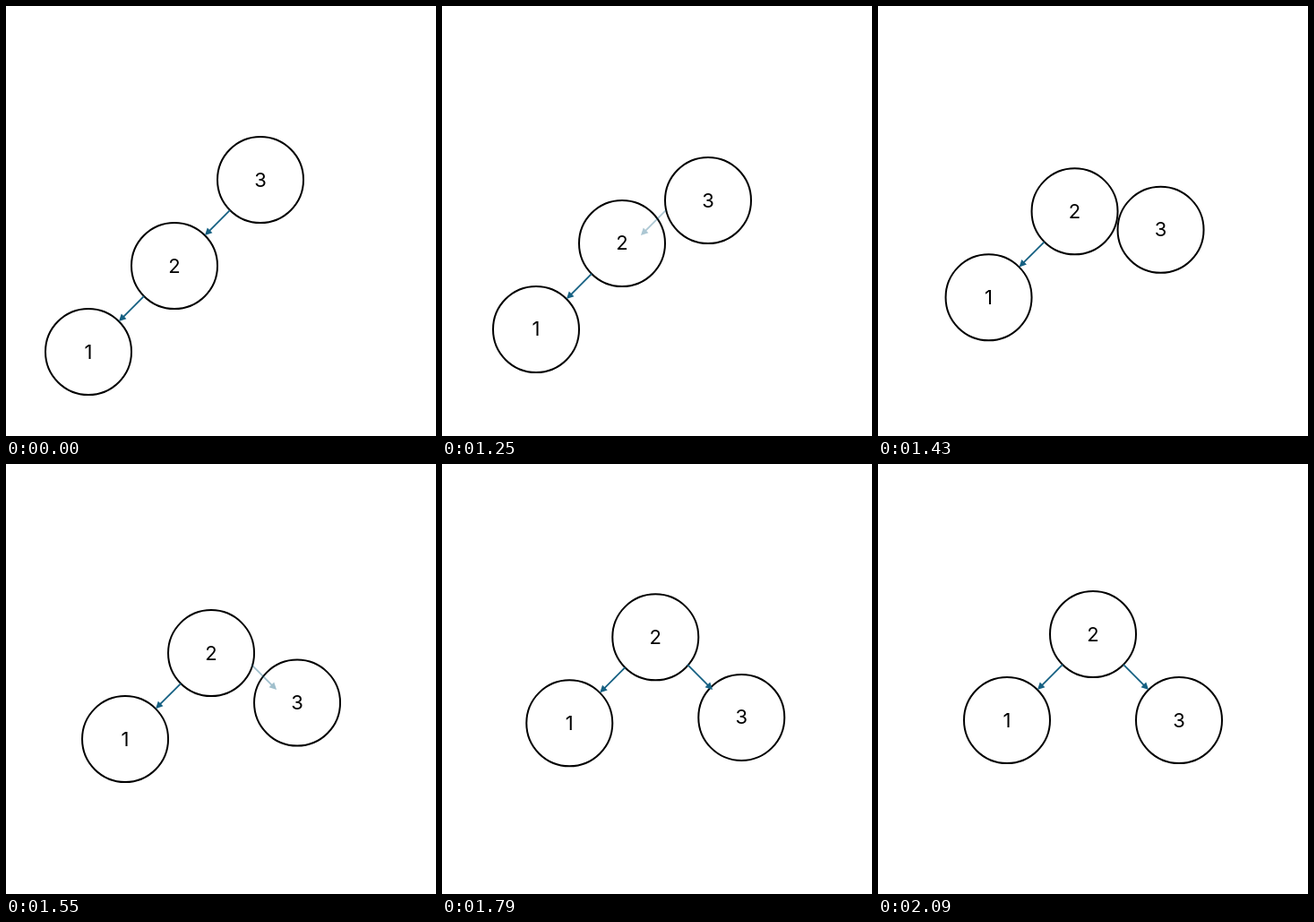
An HTML page for the animation above (3220 ms loop, 480 by 480 pixels).

```html
<!DOCTYPE html>
<html lang="en">
<head>
<meta charset="utf-8">
<title>Tree rotation</title>
<style>
  html, body { margin: 0; width: 100%; height: 100%; overflow: hidden; background: #fff; }
  svg { display: block; width: 100%; height: 100%; }
  circle { fill: none; stroke: #000; stroke-width: 2; }
  text { font: 22px Inter, "Liberation Sans", sans-serif; text-anchor: middle; }
  .arrow { fill: #156082; stroke: #156082; }
</style>
</head>
<body>
<svg id="stage" viewBox="0 0 480 480"></svg>
<script>
const LOOP = 3220, START = 1130, STEP = 60, MORPH = 1000;
const R = 48, EDGE = R * Math.SQRT1_2;
const stage = document.getElementById('stage');

function add(parent, tag, attrs) {
  const el = document.createElementNS('http://www.w3.org/2000/svg', tag);
  for (const key in attrs) el.setAttribute(key, attrs[key]);
  return parent.appendChild(el);
}

function addNode(label, from, to) {
  const el = add(stage, 'g', {});
  add(el, 'circle', { r: R });
  add(el, 'text', { y: 7.5 }).textContent = label;
  return { el, from, to };
}

// Diagonal arrow whose tail touches a parent node centred on the origin.
function addArrow(side) {
  const el = add(stage, 'g', { class: 'arrow' });
  const g = add(el, 'g', { transform: `rotate(${side < 0 ? 135 : 45})` });
  const tip = 96 * Math.SQRT2 - R;
  add(g, 'path', { d: `M${R} 0H${tip - 6}`, 'stroke-width': 1.8 });
  add(g, 'path', { d: `M${tip} 0l-8 -4v8z`, stroke: 'none' });
  return el;
}

const nodes = [
  addNode('1', [92, 386], [144, 286]),
  addNode('2', [188, 290], [240, 190]),
  addNode('3', [284, 194], [336, 286])
];
const leftArrow = addArrow(-1);
const oldArrow = addArrow(-1);
const newArrow = addArrow(1);

const clamp = v => Math.max(0, Math.min(1, v));
const place = (el, [x, y]) => el.setAttribute('transform', `translate(${x} ${y})`);
const mix = (a, b, p) => a.map((v, i) => v + (b[i] - v) * p);

// Quick start, long cubic settle.
function ease(u) {
  return u < 0.36
    ? u * u * (12.22 - 29.1 * u + 22.7 * u * u)
    : 1 - 1.5 * (1 - u) ** 3;
}

place(oldArrow, nodes[2].from);
place(newArrow, nodes[1].to);

function draw(time) {
  const t = time % LOOP;
  const step = t < START ? 0 : Math.floor((t - START) / STEP) + 1;
  const u = clamp(step * STEP / MORPH);
  const p = ease(u);
  for (const n of nodes) place(n.el, mix(n.from, n.to, p));
  place(leftArrow, mix(nodes[1].from, nodes[1].to, p));
  oldArrow.setAttribute('opacity', clamp(1 - (u - 0.03) / 0.23));
  newArrow.setAttribute('opacity', clamp((u - 0.4) / 0.2));
}

const begin = performance.now();
function tick() {
  draw(performance.now() - begin);
  requestAnimationFrame(tick);
}
tick();
</script>
</body>
</html>
```
